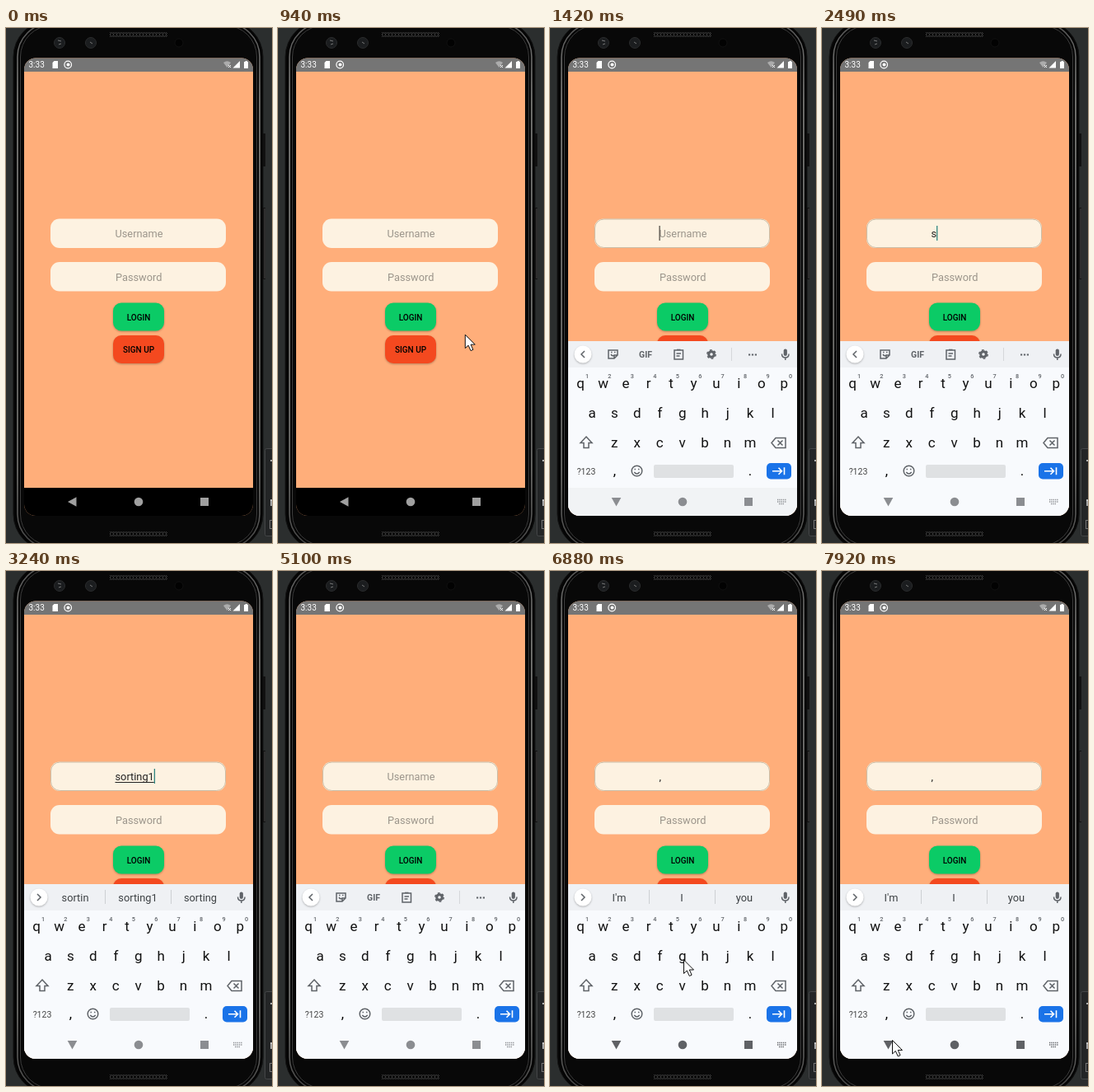
An HTML page that plays this animation: 323 px wide and 625 px high, repeating every 8 s.

```html
<!DOCTYPE html>
<html lang="en">
<head>
<meta charset="utf-8">
<title>Login form on a phone</title>
<style>
  html, body { margin: 0; width: 100%; height: 100%; overflow: hidden; background: #2b2e2e; }
  svg { display: block; width: 323px; height: 625px; font-family: Roboto, sans-serif; }
  .mid { text-anchor: middle; }
  .line { fill: none; stroke: #5f6368; stroke-width: 1.5; }
  .form { font-size: 12.8px; }
  .button { font-size: 10px; font-weight: 500; }
  .shade { filter: drop-shadow(0 1px 1px #0004); }
</style>
</head>
<body>
<svg viewBox="0 0 323 625">
  <defs>
    <clipPath id="screen"><rect x="22" y="36.500" width="278" height="555.500" rx="14"/></clipPath>
    <pattern id="mesh" width="4" height="6" patternUnits="userSpaceOnUse" y="5">
      <path d="M0 0L3 3 0 6M2 0L5 3 2 6" fill="none" stroke="#4b4b4b" stroke-width=".8"/>
    </pattern>
    <linearGradient id="rim" x2="0" y2="1">
      <stop stop-color="#555"/><stop offset=".15" stop-color="#8d8d8a"/>
      <stop offset=".85" stop-color="#7d7d7a"/><stop offset="1" stop-color="#444"/>
    </linearGradient>
  </defs>

  <!-- phone body and desktop edge -->
  <path d="M313.500 128V168M313.500 218V305" stroke="#111" stroke-width="3"/>
  <path d="M314 219V304" stroke="#666" stroke-width=".7"/>
  <rect x="9" y="-9" width="303" height="643" rx="44" fill="#050505" stroke="#111"/>
  <rect x="14" y="-6" width="294" height="637" rx="41" fill="#060606" stroke="url(#rim)" stroke-width="1.500"/>
  <rect x="17.500" y="-3" width="287" height="631" rx="38" fill="#080808" stroke="#3c3c3c"/>
  <path d="M126 5H196V11H126ZM126 611H196V617H126Z" fill="url(#mesh)"/>
  <g fill="#1b1d1f" stroke="#2b2c2d">
    <circle cx="65" cy="18" r="6.500"/><circle cx="103" cy="18" r="6.500"/>
    <circle cx="210" cy="18" r="5" fill="#020202" stroke="#111"/>
  </g>
  <path d="M63 15L67 16M64 20L67 19M102 17L105 19" stroke="#777"/>
  <rect x="314.500" y="510.500" width="20" height="106" rx="2" fill="#232526" stroke="#454748"/>
  <path d="M321 525H323M321 573H323M322 573V580" stroke="#ddd" stroke-width="1.400"/>
  <rect x="320.500" y="597.500" width="8" height="10" fill="none" stroke="#777"/>

  <g clip-path="url(#screen)">
    <rect x="22" y="36" width="278" height="556" fill="#ffae7a"/>
    <rect x="22" y="36" width="278" height="17" fill="#757575"/>
    <g fill="#fff">
      <text x="27.500" y="48" font-size="10">3:33</text>
      <path d="M58.500 40H63V49H56.500V42Z"/>
      <circle cx="75.200" cy="44.500" r="4.300" fill="none" stroke="#fff" stroke-width="1.200"/>
      <circle cx="75.500" cy="44.500" r="2"/>
      <path d="M264 42Q268.500 38.500 273 42L268.500 48Z" opacity=".4"/>
      <path d="M270 45L273 48M273 45L270 48" stroke="#fff"/>
      <path d="M284 40V48.500H275.500Z"/>
      <path d="M290.500 40H293V41H294V49H289V41H290.500Z"/>
    </g>

    <g class="form mid">
      <g fill="#fdf2e1">
        <rect x="54" y="231.500" width="213" height="35.500" rx="11"/>
        <rect x="54" y="284" width="213" height="35.500" rx="11"/>
      </g>
      <rect id="focus" x="54.500" y="232" width="212" height="34.500" rx="11"
            fill="none" stroke="#a99a80" stroke-width=".8" opacity=".75"/>
      <text id="hint" x="161.500" y="254" fill="#9b958b">Username</text>
      <text x="161.200" y="306.500" fill="#9b958b">Password</text>
    </g>
    <text id="typed" class="form" x="132.500" y="254" fill="#222"></text>
    <path id="underline" stroke="#222"/>
    <path id="caret" stroke-width="1.300"/>

    <g class="button mid">
      <rect class="shade" x="130" y="333.500" width="62" height="34" rx="10" fill="#0bcb66"/>
      <text x="161" y="354.500">LOGIN</text>
      <rect class="shade" x="130" y="373" width="62" height="34" rx="10" fill="#f4491f"/>
      <text x="161" y="394">SIGN UP</text>
    </g>

    <g id="keyboard"></g>
    <rect id="nav" x="22" y="558" width="278" height="34"/>
    <g id="navIcons">
      <path id="back" d="M-5.500 0L5 -5.800V5.800Z"/>
      <circle cx="161" cy="575" r="5.300"/>
      <rect x="236" y="570" width="10" height="10"/>
      <path id="switch" d="M276 572.500H286.500M276 575H286.500M278 577.500H284.500" fill="none"
            stroke-width="1.300" stroke-dasharray="1.300 1"/>
    </g>
  </g>
  <path id="mouse" d="M0 0V16.500L3.800 13 6.800 19.500 9.600 18.200 6.800 12H12Z" fill="#fff" stroke="#111"/>
</svg>

<script>
const $ = id => document.getElementById(id);
const show = (id, on) => $(id).style.display = on ? '' : 'none';
const label = (s, x, y, size, extra = '') =>
  `<text class="mid" x="${x}" y="${y}" font-size="${size}" ${extra}>${s}</text>`;
const keyRow = (keys, x0, y) =>
  [...keys].map((k, i) => label(k, x0 + 27.45 * i, y, 17, 'fill="#111"')).join('');

$('keyboard').innerHTML = `
  <rect x="22" y="380" width="278" height="212" fill="#f8fafd"/>
  <rect x="22" y="380" width="278" height="32" fill="#eff1f4"/>
  <circle class="shade" cx="40" cy="396" r="10.500" fill="#fff"/>
  <path id="chevron" class="line" d="M-2 -4L2 0L-2 4"/>
  <g id="tools">
    <path class="line" d="M71 391H82V397L78 401H71ZM78 401V397H82M74 396Q76 399 78 397M74 393.500H75.500M78 393.500H79.500"/>
    ${label('GIF', 116, 400, 10.5, 'font-weight="700" fill="#5f6368"')}
    <path class="line" d="M151 391H161.500V402H151ZM154 390.500H158.500M153.500 395H159M153.500 398H157.500"/>
    <circle class="line" cx="196" cy="396" r="3.300" style="stroke-width:3"/>
    <circle class="line" cx="196" cy="396" r="5.200" stroke-dasharray="2.720"/>
    <path d="M220.500 388V404" stroke="#d5d7da"/>
    <path d="M241 396.500H251" stroke="#5f6368" stroke-width="2.200" stroke-dasharray="2.200 1.700"/>
  </g>
  <g id="suggestions" class="form" fill="#3c4043">
    <path d="M120.500 387V404M200.500 387V404" stroke="#cdd0d3"/>
    ${[84, 160, 236].map(x => label('', x, 401, 12.8)).join('')}
  </g>
  <rect x="283.700" y="389.500" width="4.200" height="8.500" rx="2.100" fill="#5f6368"/>
  <path class="line" d="M281.500 395.500Q281.500 400 285.800 400T290 395.500M285.800 400V403"/>
  ${keyRow('qwertyuiop', 37.2, 436.5)}
  ${[...'1234567890'].map((d, i) => label(d, 45 + 27.45 * i, 425, 7.3, 'font-weight="500" fill="#5f6368"')).join('')}
  ${keyRow('asdfghjkl', 51, 472.5)}
  ${keyRow('zxcvbnm', 78.3, 508.5)}
  <path class="line" d="M44 496L51 503.500H47V509.500H41V503.500H37Z"/>
  <path class="line" d="M269 503.500L274 497.500H286V509.500H274ZM276.500 500.500L282.500 506.500M282.500 500.500L276.500 506.500"/>
  ${label('?123', 44, 541.5, 10.5, 'fill="#444"')}
  ${label(',', 78.5, 543, 17)}
  <circle class="line" cx="105.500" cy="537.500" r="6.300"/>
  <path class="line" d="M102.300 539Q105.500 543 108.700 539M102.500 535.500H104M107 535.500H108.500"/>
  <rect x="126" y="530" width="97" height="16" rx="2" fill="#dfe1e3"/>
  ${label('.', 243, 543, 17)}
  <rect x="263" y="528" width="30" height="19.500" rx="5" fill="#1a73e8"/>
  <path d="M270 537.800H281M277.500 533.800L281.500 537.800L277.500 541.800M284.500 533.300V542.300" fill="none" stroke="#fff" stroke-width="1.600"/>`;

const LOOP = 8000, STEP = 70, WORD = 'sorting1', BLINK = 460;
const FOCUS = 1230, TYPE = 2490, ERASE = 4360, COMMA = 6320;

// pointer path: time, x, y
const pointer = [
  [520, 305, 605], [800, 255, 470], [1060, 195, 258], [1200, 237.5, 258], [1350, 237.5, 258],
  [5170, 180, 330], [5230, 234, 458], [5570, 234, 458], [5850, 150, 597], [6120, 74, 533],
  [6390, 74, 533], [6600, 150, 243], [6720, 268, 480], [6860, 162.5, 472], [6890, 162.5, 472],
  [7150, 205, 245], [7360, 206, 118], [7500, 203, 212], [7850, 85.5, 569.5], [LOOP, 85.5, 569.5]];

const clamp = v => Math.max(0, Math.min(1, v));

function pointerAt(t) {
  const i = Math.max(1, pointer.findIndex(p => p[0] > t));
  const [t0, x0, y0] = pointer[i - 1], [t1, x1, y1] = pointer[i];
  const k = clamp((t - t0) / (t1 - t0));
  return [x0 + (x1 - x0) * k, y0 + (y1 - y0) * k];
}

function textAt(t) {
  const ticks = start => Math.floor((t - start) / STEP);
  if (t < TYPE) return '';
  if (t < ERASE) return WORD.slice(0, ticks(TYPE) + 1);
  return t < COMMA ? WORD.slice(0, Math.max(0, 7 - 2 * ticks(ERASE))) : ',';
}

function caretOn(t) {
  if (t < FOCUS) return false;
  if (t >= TYPE && t < 2980 || t >= ERASE && t < 4640) return true;
  const reset = [COMMA, 4640, 2980, FOCUS].find(r => r <= t);
  return Math.floor((t - reset) / BLINK) % 2 === 0;
}

function wordsAt(t, text) {
  if (t >= COMMA) return ["I'm", 'I', 'you'];
  const stem = WORD.slice(0, 7);
  return t < 3040 ? [WORD.slice(0, 4), text, stem] : [WORD.slice(0, 6), WORD, stem];
}

function draw(t) {
  const text = textAt(t), focused = t >= FOCUS, keyboardUp = t >= 1350;
  $('typed').textContent = text;
  show('hint', !text);
  show('focus', focused);
  const end = 132.5 + (text ? $('typed').getComputedTextLength() : 0);
  $('underline').setAttribute('d', text.length > 1 ? `M132.500 256.500H${end}` : '');
  $('caret').setAttribute('d', `M${end + .6} 240V258`);
  $('caret').setAttribute('stroke', text ? '#2f8580' : '#55504a');
  show('caret', caretOn(t));

  const suggesting = t >= TYPE + STEP && t < 4700 || t >= COMMA;
  show('suggestions', suggesting);
  show('tools', !suggesting);
  $('chevron').setAttribute('transform', `translate(40 396) scale(${suggesting ? 1 : -1} 1)`);
  const words = wordsAt(t, text);
  $('suggestions').querySelectorAll('text').forEach((el, i) => el.textContent = words[i]);

  show('keyboard', keyboardUp);
  $('keyboard').setAttribute('transform', `translate(0 ${t < 1420 ? 60 : 0})`);
  $('nav').setAttribute('fill', !keyboardUp ? '#000' : t < 1490 ? '#f1f3f5' : '#f8fafd');
  const ink = !keyboardUp ? '#a0a0a0' : t < 5850 ? '#8b8d91' : '#5f6165';
  $('navIcons').setAttribute('fill', ink);
  $('switch').setAttribute('stroke', ink);
  show('switch', focused);
  const turn = t < 1280 ? 0 : t < 1350 ? -15 : t < 1420 ? -55 : -90;
  $('back').setAttribute('transform', `translate(80.500 575) rotate(${turn})`);

  show('mouse', t >= 520 && t < 1350 || t >= 5170);
  const [x, y] = pointerAt(Math.floor((t - 10) / STEP) * STEP + 10);
  $('mouse').setAttribute('transform', `translate(${x} ${y})`);
}

function tick() {
  draw(performance.now() % LOOP);
  requestAnimationFrame(tick);
}
tick();
</script>
</body>
</html>
```
